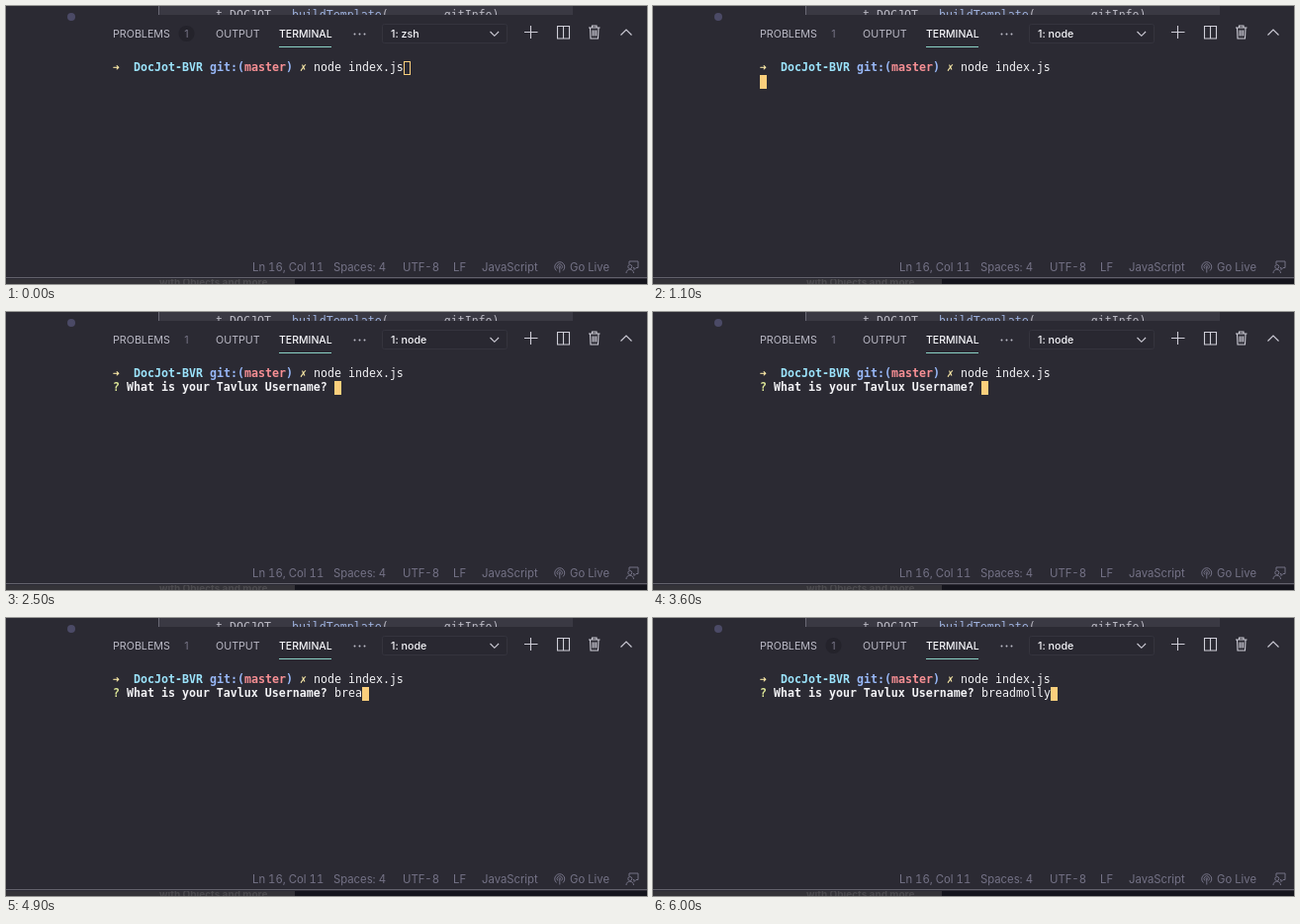
These frames come from a looping animation (648 by 282 pixels, 6100 ms). An HTML page:

```html
<!DOCTYPE html>
<html lang="en">
<head>
<meta charset="utf-8">
<title>Terminal prompt</title>
<style>
  html, body { margin: 0; width: 100%; height: 100%; overflow: hidden; background: #2b2a33; }
  svg { display: block; width: 648px; height: 282px; }
  text { white-space: pre; }
  .mono { font: 11.628px "DejaVu Sans Mono", monospace; fill: #f2f2f5; }
  .bold { font-weight: 700; }
  .ui { font: 10.7px Inter, "Open Sans", sans-serif; fill: #bbbac6; }
  .status { font: 11.3px Inter, "Open Sans", sans-serif; fill: #747286; font-variant-numeric: tabular-nums; }
  .line { fill: none; stroke: #cfced8; stroke-width: 1.1; }
  .dim { fill: none; stroke: #747286; stroke-width: 1; }
  .light { fill: #f6f6fa; font-weight: 500; }
  .yellow { fill: #fae9a6; }
  .cyan { fill: #9be3fb; }
  .blue { fill: #98b8f8; }
  .red { fill: #f78f94; }
  .lime { fill: #dbe596; }
</style>
</head>
<body>
<svg viewBox="0 0 648 282">
  <defs>
    <clipPath id="editorClip"><rect x="154" width="419" height="9"/></clipPath>
    <clipPath id="footClip"><rect y="277" width="292" height="5"/></clipPath>
  </defs>
  <rect width="648" height="282" fill="#2b2a33"/>

  <!-- editor edge above the panel -->
  <rect x="154" width="419" height="9" fill="#3a3943"/>
  <path d="M154.5 0V9" stroke="#6a6975"/>
  <g clip-path="url(#editorClip)">
    <text class="mono" x="212" y="13" style="fill:#b9b8c2">t DOCJOT   <tspan fill="#9db0dc">buildTemplate</tspan>(        gitInfo)</text>
  </g>
  <circle cx="66" cy="11" r="4" fill="#4b4a66"/>

  <!-- panel tabs -->
  <g class="ui">
    <text x="108" y="32">PROBLEMS</text>
    <circle id="badge" cx="182.5" cy="28" r="8" fill="#24232b"/>
    <text x="182.5" y="32" text-anchor="middle" style="fill:#777587">1</text>
    <text x="212" y="32">OUTPUT</text>
    <text class="light" x="276" y="32" style="font-size:10.5px">TERMINAL</text>
  </g>
  <rect x="276" y="41" width="53" height="1" fill="#8bd2c6"/>
  <g fill="#c0bfca">
    <circle cx="352.5" cy="28.5" r="1"/>
    <circle cx="357.5" cy="28.5" r="1"/>
    <circle cx="362.5" cy="28.5" r="1"/>
  </g>
  <rect x="380.5" y="18.5" width="126" height="19" rx="2" fill="#292831" stroke="#35343e"/>
  <text id="shell" class="ui light" x="389" y="32"></text>
  <g class="line">
    <path d="M489.5 26l4.3 4.3 4.3-4.3"/>
    <path d="M524 26.5h13.5M530.5 20v13"/>
    <path d="M557.5 20.5h12v12.5h-12zM563.5 20.5v12.5"/>
    <path d="M589 22h11.5M592.5 22v-2h4.5v2M590.5 22l.5 11h7.5l.5-11M593 24.5v6M594.8 24.5v6M596.6 24.5v6"/>
    <path d="M621.5 29.5l5.5-5.5 5.5 5.5"/>
  </g>

  <!-- terminal -->
  <g class="mono">
    <g class="bold">
      <text class="yellow" x="108" y="66">➜</text>
      <text class="cyan" x="129" y="66">DocJot-BVR</text>
      <text class="blue" x="206" y="66">git:(<tspan class="red">master</tspan>)</text>
      <text class="yellow" x="297" y="66">✗</text>
    </g>
    <text x="311" y="66">node index.js</text>
    <g id="prompt">
      <text class="lime bold" x="108" y="80">?</text>
      <text class="bold" x="122" y="80">What is your Tavlux Username?</text>
      <text id="answer" x="332" y="80"></text>
    </g>
  </g>
  <rect id="cursor" width="7" height="14"/>

  <!-- status bar -->
  <g class="status">
    <text x="249" y="269">Ln 16, Col 11</text>
    <text x="331" y="269">Spaces: 4</text>
    <text x="401" y="269">UTF-8</text>
    <text x="452" y="269">LF</text>
    <text x="481" y="269">JavaScript</text>
    <text x="570" y="269">Go Live</text>
  </g>
  <g class="dim">
    <path d="M556.5 268.5a5 5 0 1 1 6.5 0M558 266.5a2.7 2.7 0 1 1 3.5 0M559.8 265v5.5"/>
    <circle cx="559.8" cy="264.5" r=".8"/>
    <path d="M630 262v-3h9v6.5h-2l-2 2v-2h-1"/>
    <circle cx="630.8" cy="264.5" r="2"/>
    <path d="M627 271c0-5 7.5-5 7.5 0"/>
  </g>

  <!-- window edge -->
  <rect y="275" width="648" height="1" fill="#62616c"/>
  <rect y="277" width="292" height="5" fill="#343338"/>
  <rect x="292" y="277" width="356" height="5" fill="#14141c"/>
  <g clip-path="url(#footClip)">
    <text x="155" y="284" font-family="Inter, sans-serif" font-size="10" font-weight="700" fill="#4b4a4e">with Objects and more</text>
  </g>
</svg>
<script>
  const LOOP = 6100, CELL = 7, LEFT = 108;
  const FOCUS = 600, ENTER = 800, RUN = 900, ASK = 2300;
  const NAME = 'breadmolly';
  const KEYS = [4000, 4200, 4400, 4700, 5000, 5200, 5400, 5600, 5800, 5900];
  const BADGE = [[0, 200], [4000, 4800], [5600, LOOP]];

  const el = id => document.getElementById(id);
  const set = (node, attrs) => {
    for (const key in attrs) node.setAttribute(key, attrs[key]);
  };
  const [badge, shell, prompt, answer, cursor] =
    ['badge', 'shell', 'prompt', 'answer', 'cursor'].map(el);

  function placeCursor(t, typed) {
    const col = t < ENTER ? 42 : t < ASK ? 0 : 32 + typed;
    const hollow = t < FOCUS;
    const inset = hollow ? 0.5 : 0;
    set(cursor, {
      x: LEFT + col * CELL + inset,
      y: (t < ENTER ? 56 : 70) + inset,
      width: CELL - 2 * inset,
      height: 14 - 2 * inset,
      fill: hollow ? 'none' : '#fbcf7c',
      stroke: hollow ? '#fbcf7c' : 'none'
    });
  }

  function draw(t) {
    const typed = KEYS.filter(k => k <= t).length;
    shell.textContent = t < RUN ? '1: zsh' : '1: node';
    answer.textContent = NAME.slice(0, typed);
    set(prompt, { visibility: t < ASK ? 'hidden' : 'visible' });
    set(badge, { opacity: BADGE.some(([a, b]) => t >= a && t < b) ? 1 : 0 });
    placeCursor(t, typed);
  }

  const start = performance.now();
  function tick() {
    draw((performance.now() - start) % LOOP);
    requestAnimationFrame(tick);
  }
  tick();
</script>
</body>
</html>
```
